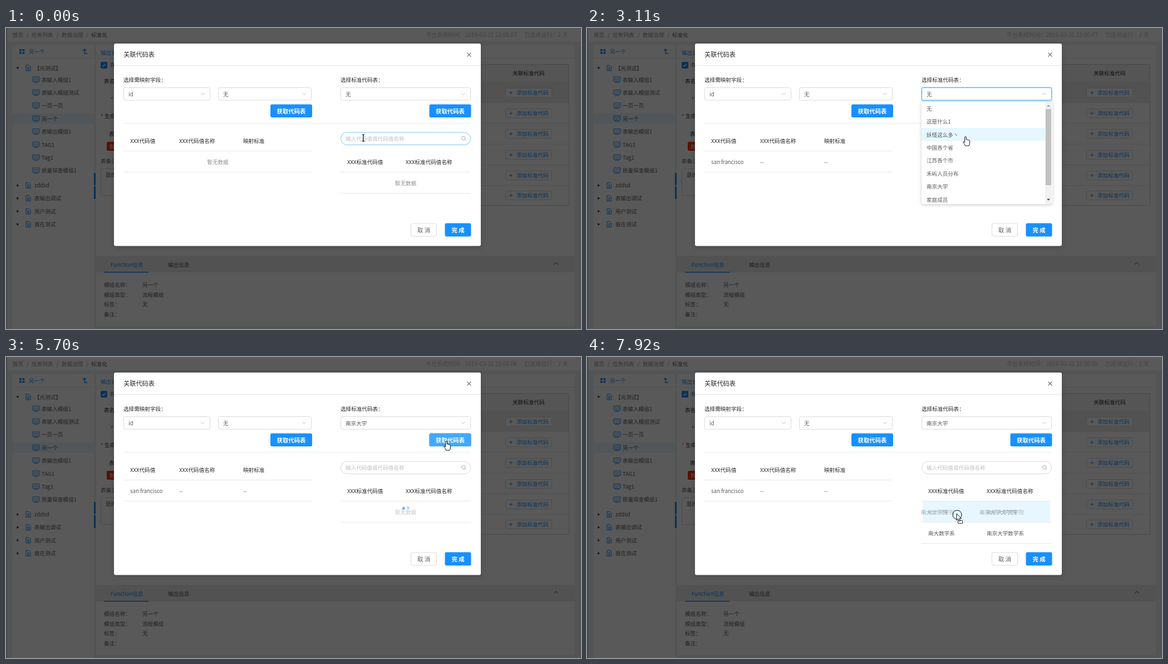
An HTML page with a canvas that plays this animation: 1033 px wide and 542 px high, repeating every 8 s.

```html
<!DOCTYPE html>
<html lang="zh-CN">
<head>
<meta charset="utf-8">
<style>
html, body { margin: 0; width: 100%; height: 100%; overflow: hidden; background: #595959; }
canvas { display: block; }
</style>
</head>
<body>
<canvas id="stage" width="1033" height="542"></canvas>
<script>
const g = document.getElementById('stage').getContext('2d');
const LOOP = 8000, STEP = 135;
const BLUE = '#1890ff', PALE = '#40a9ff', TINT = '#e6f7ff', LINE = '#e8e8e8';
const DARK = 'rgba(0,0,0,.85)', TEXT = 'rgba(0,0,0,.65)', SOFT = 'rgba(0,0,0,.45)', HINT = '#bfbfbf';
const FONT = '"Noto Sans CJK SC", "Noto Sans CJK", "Noto Sans", sans-serif';

// y is the visual middle of the line
function text(s, x, y, color = TEXT, size = 9.6, align = 'left', weight = 400) {
  g.font = `${weight} ${size}px ${FONT}`;
  g.textAlign = align;
  g.fillStyle = color;
  g.fillText(s, x, y + size * .38);
}
function rect(x, y, w, h, color) {
  g.fillStyle = color;
  g.fillRect(x, y, w, h);
}
function box(x, y, w, h, r, fill, border) {
  const inset = border ? .5 : 0;
  g.beginPath();
  g.roundRect(x + inset, y + inset, w - 2 * inset, h - 2 * inset, r);
  if (fill) { g.fillStyle = fill; g.fill(); }
  if (border) { g.strokeStyle = border; g.lineWidth = 1; g.stroke(); }
}
function shape(d, x, y, { fill, stroke, width = 1, turn = 0 }) {
  const p = new Path2D(d);
  g.save();
  g.translate(x, y);
  g.rotate(turn);
  g.lineWidth = width;
  g.lineJoin = 'round';
  if (fill) { g.fillStyle = fill; g.fill(p); }
  if (stroke) { g.strokeStyle = stroke; g.stroke(p); }
  g.restore();
}
function faded(alpha, draw) {
  g.save();
  g.globalAlpha *= alpha;
  draw();
  g.restore();
}
const ramp = (t, a, b) => Math.min(1, Math.max(0, (t - a) / (b - a)));
const latest = (keys, t) => keys.filter(k => k[0] <= t).pop()[1];

const CLOCK = [[0, '07'], [600, '06'], [2600, '07'], [3240, '08'], [4185, '09'], [5500, '06'], [6480, '07'], [7650, '08']];
const POINTER = [[0, 'beam'], [270, 'arrow'], [675, 'hand'], [1350, 'arrow'], [1755, 'hand'], [4185, 'arrow'],
  [4725, 'hand'], [6200, 'arrow'], [6480, 'move'], [7695, 'drag']];
const PATH = [[0, 642, 198], [135, 642, 198], [810, 520, 152], [1215, 520, 152], [1485, 745, 160], [1890, 715, 118],
  [2295, 715, 118], [2565, 700, 150], [3105, 680, 196], [3240, 676, 214], [3375, 674, 218], [3780, 654, 282],
  [4185, 654, 282], [4860, 791, 152], [5805, 791, 152], [6615, 741, 312], [7290, 677, 283], [7560, 677, 283], [7830, 664, 282]];
const OPTIONS = ['无', '这是什么1', '妖怪这么多丶', '中国各个省', '江苏各个市', '禾屿人员分布', '南京大学', '家庭成员'];
const ROWS = [['南大文学院', '南京大学文学院'], ['南大数学系', '南京大学数学系']];

function position(t) {
  const i = PATH.findIndex(p => p[0] > t);
  if (i < 0) return PATH[PATH.length - 1].slice(1);
  const a = PATH[i - 1], b = PATH[i], k = ramp(t, a[0], b[0]);
  return [a[1] + (b[1] - a[1]) * k, a[2] + (b[2] - a[2]) * k];
}

const DOC = 'M-4 -5H1L4 -2V5H-4ZM-2 -1H2M-2 1H2M-2 3H2';
const CODE = 'M-6 -5H6V3H-6ZM-4 5H4M-2 -3L-4 -1L-2 1M2 -3L4 -1L2 1M1 -3L-1 1';

function sidebar() {
  rect(12, 31, 146, 511, '#fff');
  rect(12, 54, 146, 1, LINE);
  for (const [x, y] of [[24, 38], [29.5, 38], [24, 43], [29.5, 43]]) rect(x, y, 4, 3.6, BLUE);
  text('另一个', 41, 42.5, BLUE);
  shape('M5 4H0V-4M-3 -1L0 -4L3 -1', 141, 42, { stroke: BLUE, width: 1.5 });
  rect(12, 154, 146, 18, TINT);
  shape('M-2.5 -1.5H2.5L0 2Z', 21, 72, { fill: DARK });
  shape(DOC, 40, 72, { stroke: BLUE });
  text('【光测试】', 51, 72.5);
  ['表输入模组1', '表输入模组测试', '一页一页', '另一个', '表输出模组1', 'TAG1', 'Tag1', '质量探查模组1'].forEach((s, i) => {
    const y = 93 + i * 23.4;
    shape(CODE, 54, y, { stroke: BLUE });
    text(s, 64, y);
  });
  ['zddsd', '表输出调试', '用户测试', '我在测试'].forEach((s, i) => {
    const y = 283.5 + i * 23.3;
    shape('M-1.5 -2.5V2.5L2 0Z', 21, y, { fill: DARK });
    shape(DOC, 40, y, { stroke: BLUE });
    text(s, 51, y);
  });
  rect(158, 261, 3, 47, BLUE);
  shape('M-1 -2V2L1 0Z', 160, 284, { fill: '#fff' });
}

function page(t) {
  rect(0, 0, 1033, 542, '#f0f2f5');
  rect(0, 0, 1033, 24, '#fff');
  rect(0, 0, 2, 542, '#ccc');
  [['首页', 12], ['/', 37], ['任务列表', 46], ['/', 91], ['数据治理', 100], ['/', 144]].forEach(([s, x]) => text(s, x, 12, SOFT));
  text('标准化', 153, 12, TEXT);
  text('平台系统时间：2019-03-21 23:00:' + latest(CLOCK, t), 754, 12.5, HINT, 10.1);
  text('已连续运行：2 天', 931, 12.5, HINT, 10.1);
  sidebar();

  rect(162, 31, 860, 379, '#fff');
  rect(162, 54, 860, 1, LINE);
  text('输出设置', 170, 44.5, BLUE);
  box(170, 61, 12, 12, 2, BLUE);
  shape('M-3 0L-1 2L3 -2', 176, 67, { stroke: '#fff', width: 1.3 });
  text('存储', 187, 66.5);
  text('表名', 176, 95.5, DARK);
  text('*', 188, 128, '#f5222d');
  text('*', 170, 159, '#f5222d');
  text('生命', 177, 158.5, DARK);
  text('表', 185, 190, DARK);
  box(181, 205, 30, 16, 2, '#f5330a');
  text('默认', 186, 213, '#fff');
  text('表备注', 170, 239.5);
  box(170, 253, 60, 49, 3, '#fff', '#d9d9d9');
  text('是的', 179, 264.5);

  box(840, 65, 172, 255, 2, null, '#d0d0d0');
  rect(840, 66, 171, 31, '#f5f5f5');
  rect(840, 98, 171, 37, '#ececec');
  text('关联标准代码', 910, 81.5, DARK);
  [116, 153, 190, 228, 265, 301].forEach((y, i) => {
    rect(840, 97 + i * 37.2, 171, 1, LINE);
    box(897, y - 8, 84, 17, 2, '#fff', '#d9d9d9');
    shape('M-3 0H3M0 -3V3', 907, y + .5, { stroke: BLUE });
    text('添加标准代码', 917, y + .5, BLUE);
  });

  rect(162, 411, 860, 29, '#ececec');
  rect(162, 440, 860, 97, '#fff');
  text('Function信息', 188, 426, BLUE);
  text('输出信息', 291, 426);
  rect(176, 439, 80, 1.5, BLUE);
  shape('M-4 2L0 -2L4 2', 988, 424, { stroke: TEXT });
  [['模组名称：', '另一个'], ['模组类型：', '流程模组'], ['标签：', '无'], ['备注：', '']].forEach(([a, b], i) => {
    text(a, 176, 462.5 + i * 17.6);
    text(b, 245, 462.5 + i * 17.6);
  });
  rect(0, 0, 1033, 542, 'rgba(0,0,0,.65)');
}

function select(x, w, value, focus = 0, turn = 0) {
  if (focus) faded(focus, () => box(x - 1.5, 105.5, w + 3, 27, 4, 'rgba(24,144,255,.2)'));
  box(x, 107, w, 23.5, 3, '#fff', focus ? PALE : '#d9d9d9');
  text(value, x + 9, 119);
  shape('M-3.5 -1.7L0 1.7L3.5 -1.7', x + w - 13.5, 118.5, { stroke: HINT, turn });
}
function button(x, pale) {
  box(x, 137.5, 75, 23.5, 3, BLUE);
  faded(pale, () => box(x, 137.5, 75, 23.5, 3, PALE));
  text('获取代码表', x + 37.5, 150, '#fff', 10.4, 'center', 700);
}
function spinner(x, y, t) {
  const base = (t - 1485) / 1200 * 2 * Math.PI - Math.PI / 4;
  [.65, .32].forEach((alpha, i) => faded(alpha, () => {
    const a = base - i * Math.PI / 2;
    g.beginPath();
    g.arc(x + 5.7 * Math.cos(a), y + 5.7 * Math.sin(a), 2.6, 0, 7);
    g.fillStyle = BLUE;
    g.fill();
  }));
}

function leftTable(t) {
  [['XXX代码值', 223], ['XXX代码值名称', 311], ['映射标准', 426]].forEach(([s, x]) => text(s, x, 203, DARK));
  rect(211, 221, 338, 1, LINE);
  rect(211, 259, 338, 1, LINE);
  if (t < 1250) faded(t < 945 ? 1 : .5, () => text('暂无数据', 380.5, 241, SOFT, 9.6, 'center'));
  else [['san francisco', 223], ['--', 311], ['--', 426]].forEach(([s, x]) => text(s, x, 241));
  if (t >= 945 && t < 1600) spinner(381, 230, t);
}

function row(cells, y, dx = 0) {
  text(cells[0], 613 + dx, y);
  text(cells[1], 718 + dx, y);
}
function rightTable(t, [x]) {
  const dragging = t >= 7695;
  box(601, 187.5, 234, 23.5, 12, '#fff', t < 270 ? '#7dc3f7' : '#d9d9d9');
  text('输入代码值或代码值名称', 610, 199.5, HINT);
  shape('M3 -.5A3.3 3.3 0 1 1 -3.6 -.5A3.3 3.3 0 1 1 3 -.5M2.2 1.8L4.5 4', 822, 199, { stroke: '#aaa' });
  text('XXX标准代码值', 613, 241, DARK);
  text('XXX标准代码值名称', 718, 241, DARK);
  rect(601, 259, 234, 1, LINE);
  rect(601, 297, 234, 1, LINE);
  if (t < 6000) {
    faded(t < 5500 ? 1 : .5, () => text('暂无数据', 718, 279, SOFT, 9.6, 'center'));
    if (t >= 5500) spinner(718, 268, t);
    return;
  }
  if (t >= 7000) rect(603, 260, 229, 37, TINT);
  faded(dragging ? .4 : 1, () => row(ROWS[0], 279));
  row(ROWS[1], 317);
  rect(601, 335, 234, 1, LINE);
  if (dragging) faded(.5, () => {
    const glow = g.createLinearGradient(588, 0, 640, 0);
    glow.addColorStop(0, 'rgba(230,247,255,0)');
    glow.addColorStop(1, TINT);
    rect(588, 272, 52, 16, glow);
    row(ROWS[0], 279.5, x - 677);
  });
}

function dropdown(t, y) {
  const shown = ramp(t, 2200, 2430) * (1 - ramp(t, 4185, 4450));
  if (!shown) return;
  g.save();
  g.globalAlpha = shown;
  g.translate(0, 133);
  g.scale(1, .8 + .2 * shown);
  g.translate(0, -133);
  g.shadowColor = 'rgba(0,0,0,.2)';
  g.shadowBlur = 6;
  g.shadowOffsetY = 1.5;
  box(601, 133, 235, 184, 3, '#fff');
  g.shadowColor = 'transparent';
  g.beginPath();
  g.rect(601, 133, 235, 183.5);
  g.clip();
  const over = t < 4185 ? Math.floor((y - 133.2) / 23.4) : 6;
  OPTIONS.forEach((s, i) => {
    const top = 133.2 + i * 23.4;
    if (i === over) rect(601, top, 222, 23.4, TINT);
    text(s, 610, top + 12);
  });
  rect(823, 133, 12, 184, '#f1f1f1');
  rect(824, 146, 10, 137, '#c1c1c1');
  shape('M-3 1.5H3L0 -1.8Z', 829, 140, { fill: '#999' });
  shape('M-3 -1.5H3L0 1.8Z', 829, 309, { fill: '#505050' });
  g.restore();
}

function modal(t, at) {
  g.save();
  g.shadowColor = 'rgba(0,0,0,.15)';
  g.shadowBlur = 10;
  g.shadowOffsetY = 3;
  box(194, 28, 659, 364.5, 3, '#fff');
  g.restore();
  text('关联代码表', 211, 48, DARK, 11.2);
  shape('M-3.5 -3.5L3.5 3.5M3.5 -3.5L-3.5 3.5', 832, 48, { stroke: '#777', width: 1.2 });
  rect(194, 67, 659, 1, LINE);
  text('选择需映射字段：', 211, 93.5, DARK);
  text('选择标准代码表：', 601, 93.5, DARK);
  select(211, 156, 'id');
  select(381, 168, '无');
  const turn = Math.PI * ramp(t, 2200, 2430) * (1 - ramp(t, 4085, 4285));
  select(601, 234, t < 4185 ? '无' : '南京大学', ramp(t, 1990, 2100) * (1 - ramp(t, 5380, 5600)), turn);
  button(475, ramp(t, 640, 900) * (1 - ramp(t, 2150, 2420)));
  button(760.5, ramp(t, 4760, 4960) * (1 - ramp(t, 7550, 7760)));
  rect(211, 171, 624, 1, LINE);
  leftTable(t);
  rightTable(t, at);
  box(727, 351.5, 47, 24, 3, '#fff', '#d9d9d9');
  text('取 消', 750.5, 364, TEXT, 10.4, 'center');
  box(788.5, 351.5, 47, 24, 3, BLUE);
  text('完 成', 812, 364, '#fff', 10.4, 'center', 700);
  dropdown(t, at[1]);
}

const ARROW = 'M0 0V12L2.8 9.4L4.8 13.8L6.7 13L4.8 8.8H8.5Z';
const HAND = 'M-1.3 8V1Q-1.3 -.3 0 -.3Q1.3 -.3 1.3 1V5Q3.2 4.2 3.8 5.5Q5.5 5 6 6.2Q7.6 5.8 7.6 7.5V11Q7.6 13 6 16H-.5Q-1 13.5 -4.3 9.8Q-4.5 7.5 -1.3 10Z';
const BEAM = 'M-2.5 -6H-.8L0 -5.3L.8 -6H2.5M0 -5.3V5.3M-2.5 6H-.8L0 5.3L.8 6H2.5';
const MOVE = 'M0 -8L3 -4.5H1V-1H4.5V-3L8 0L4.5 3V1H1V4.5H3L0 8L-3 4.5H-1V1H-4.5V3L-8 0L-4.5 -3V-1H-1V-4.5H-3Z';
function pointer(kind, [x, y]) {
  const look = { fill: '#fff', stroke: '#111' };
  if (kind === 'beam') shape(BEAM, x, y, { stroke: '#111', width: 1.2 });
  if (kind === 'hand') shape(HAND, x, y, look);
  if (kind === 'move') shape(MOVE, x, y, look);
  if (kind === 'drag') {
    shape('M8 0A8 8 0 1 1 -8 0A8 8 0 1 1 8 0', x + 1, y + 2, { stroke: '#111' });
    box(x + 2, y + 12, 9, 6, 0, '#fff', '#333');
  }
  if (kind === 'arrow' || kind === 'drag') shape(ARROW, x, y, look);
}

const start = performance.now();
function frame() {
  const now = Math.max(0, performance.now() - start) % LOOP;
  const t = Math.floor(now / STEP) * STEP;
  const at = position(t);
  page(t);
  modal(t, at);
  pointer(latest(POINTER, t), at);
  requestAnimationFrame(frame);
}
frame();
</script>
</body>
</html>
```
